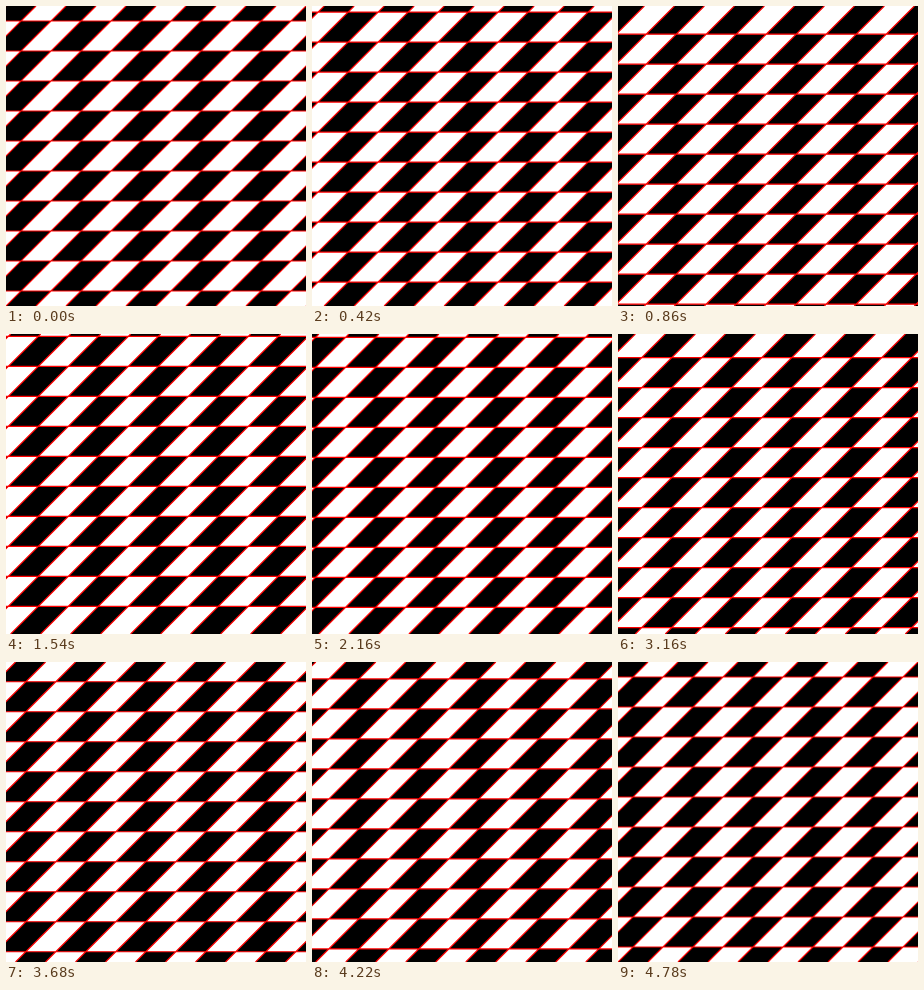
These frames come from a looping animation (300 by 300 pixels, 4.8 s). An HTML page with a canvas:

```html
<!DOCTYPE html>
<html lang="en">
<head>
<meta charset="utf-8">
<title>Sliding slanted checks</title>
<style>
  html, body { margin: 0; width: 100%; height: 100%; overflow: hidden; background: #fff; }
  canvas { display: block; }
</style>
</head>
<body>
<canvas id="stage" width="300" height="300"></canvas>
<script>
const SIZE = 300, TILE = 30, START = 15;
const LOOP = 4800, STEP = 20, TRAVEL = 240;
const LAST = LOOP / STEP - 1;
const ctx = document.getElementById('stage').getContext('2d');

// Every row repeats the one above: the slant and the alternation cancel out.
function draw(shift) {
  const top = START + shift % TILE - 2 * TILE;
  const left = START + shift % (2 * TILE) - 4 * TILE;

  ctx.fillStyle = '#fff';
  ctx.fillRect(0, 0, SIZE, SIZE);

  ctx.beginPath();
  for (let y = top; y < SIZE; y += TILE) {
    for (let x = left; x < SIZE + 2 * TILE; x += 2 * TILE) {
      ctx.moveTo(x, y);
      ctx.lineTo(x + TILE, y);
      ctx.lineTo(x, y + TILE);
      ctx.lineTo(x - TILE, y + TILE);
      ctx.closePath();
    }
  }
  ctx.fillStyle = '#000';
  ctx.fill();

  ctx.beginPath();
  for (let y = top; y < SIZE + TILE; y += TILE) {
    ctx.moveTo(0, y);
    ctx.lineTo(SIZE, y);
  }
  for (let x = left + top; x < 2 * SIZE + TILE; x += TILE) {
    ctx.moveTo(x, 0);
    ctx.lineTo(x - SIZE, SIZE);
  }
  ctx.strokeStyle = '#f00';
  ctx.lineWidth = 1.2;
  ctx.stroke();
}

const t0 = performance.now();
function tick() {
  const t = (performance.now() - t0) % LOOP;
  draw(Math.floor(t / STEP) / LAST * TRAVEL);
  requestAnimationFrame(tick);
}
tick();
</script>
</body>
</html>
```
